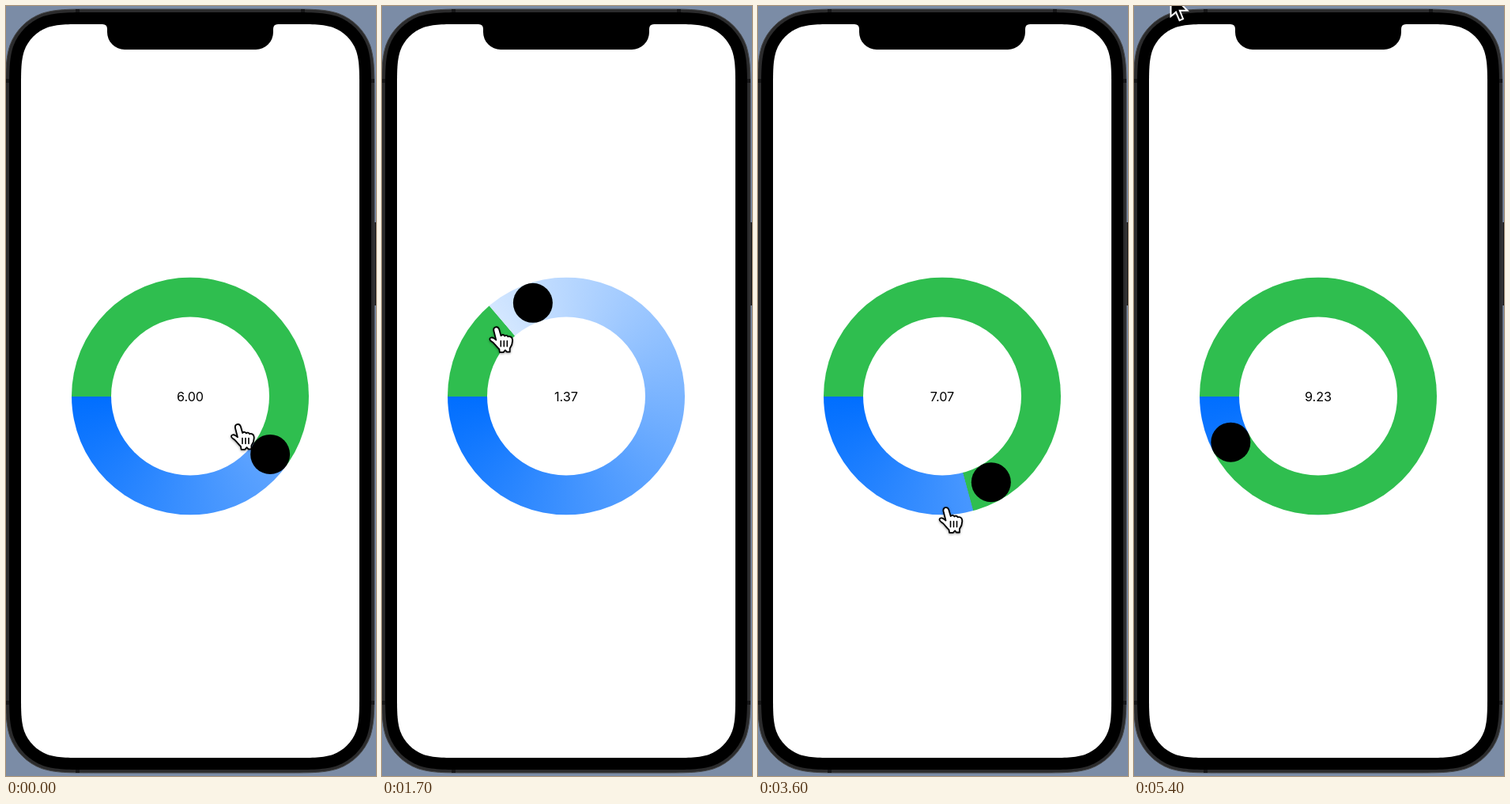
These frames come from a looping animation (468x972 px, 5500 ms). An HTML page:

```html
<!DOCTYPE html>
<html lang="en">
<head>
<meta charset="utf-8">
<title>Circular slider</title>
<style>
  html, body { margin: 0; width: 100%; height: 100%; overflow: hidden; background: #7b8ca6; }
  #stage { position: relative; width: 468px; height: 972px; overflow: hidden; }
  svg { position: absolute; left: 0; top: 0; }
  #ring {
    position: absolute; left: 83px; top: 342px; width: 300px; height: 300px; border-radius: 50%;
    transform: translateY(.5px);
    background:
      conic-gradient(from 270deg, #2fbe4f var(--v), transparent calc(var(--v) + .08%)),
      conic-gradient(from 270deg, #f5faff, #006eff);
  }
  #hole { position: absolute; inset: 50px; border-radius: 50%; background: #fff; }
</style>
</head>
<body>
<div id="stage">
  <svg width="468" height="972">
    <path d="M466 273h2v105h-2z" fill="#17181a"/>
    <path id="rim" fill="#2b2b2c" stroke="#464748"/>
    <path d="M0 92h4v5h-4zM0 877h4v5h-4zM462 92h4v5h-4zM462 877h4v5h-4zM88 4h5v4h-5zM373 4h5v4h-5zM88 964h5v4h-5z" fill="#171718"/>
    <path id="bezel"/>
    <path id="screen" fill="#fff"/>
    <path d="M122 22v1q6 0 6 6v4a22 22 0 0 0 22 22h166a22 22 0 0 0 22-22v-4q0-6 6-6v-1z"/>
  </svg>
  <div id="ring"><div id="hole"></div></div>
  <svg width="468" height="972">
    <text id="label" x="233" y="498.7" text-anchor="middle" font-family="Inter, sans-serif" font-size="16.2"></text>
    <circle id="knob" r="25"/>
    <g id="hand" stroke="#000" stroke-linejoin="round" stroke-linecap="round" style="filter:drop-shadow(0 1.5px 1.5px rgba(0,0,0,.4))">
      <path fill="#fff" stroke-width="1.8" d="M-2.2 4.6C-3-.6 3-1.6 4.6 2.8L7 11C8 9.2 11 9.4 11.6 11.4 12.8 10 15.2 10.5 15.8 12.2 18 11.4 21 12.4 21.4 15.5 22 20 20.4 24 18.2 27V31.4H14.4L12.4 29.2 10 31.8H5.4L4.8 28C1.8 25.4-.2 22.2-2.6 20-4.6 18.2-7.2 17.4-7.2 15.2-7.2 13-4.2 12.6-1.8 14.4L.8 16.4z"/>
      <path stroke-width="1.6" d="M6.8 17.5v7M10.8 17.5v7M14.8 17.5v7"/>
    </g>
    <path id="arrow" d="M0 0V28.5L6.5 23 11 33.5 15.5 31.5 11.3 21.2H21z" stroke="#fff" stroke-width="2"/>
  </svg>
</div>
<script>
const LOOP = 5500, STEP = 100, LAG = 150;
const CX = 233, CY = 492.5, TRACK = 125;
const $ = id => document.getElementById(id);

// Drag turning points: time, dial value (0 to 10)
const dial = [
  [300, 6], [900, 4.9], [1700, 1.37], [2100, .87], [2400, 2.44],
  [2950, 5.375], [3100, 5.76], [4200, 8.55], [4700, 9.23]
];

// Pointer path: time, direction on the dial, distance from its centre
const pointer = [
  [0, 5.86, 69], [900, 4.445, 113], [1700, 1.23, 125], [2050, .8, 127], [2400, 2.26, 133],
  [3100, 5.75, 145], [4200, 9.01, 131], [4900, 9.5, 120], [5400, 11.94, 541]
];

// Smooth curve through the keys, level at the ends and at every turn.
function curve(keys, t, col = 1) {
  const last = keys.length - 1;
  if (t <= keys[0][0]) return keys[0][col];
  if (t >= keys[last][0]) return keys[last][col];

  const slope = i => {
    if (i === 0 || i === last) return 0;
    const [a, b, c] = keys.slice(i - 1, i + 2);
    const turns = (b[col] - a[col]) * (c[col] - b[col]) <= 0;
    return turns ? 0 : (c[col] - a[col]) / (c[0] - a[0]);
  };
  const i = keys.findIndex(k => k[0] > t);
  const a = keys[i - 1], b = keys[i], span = b[0] - a[0];
  const s = (t - a[0]) / span, r = 1 - s;
  return a[col] + (b[col] - a[col]) * s * s * (3 - 2 * s) +
    span * s * r * (r * slope(i - 1) - s * slope(i));
}

function onDial(value, radius) {
  const a = Math.PI * (1 + value / 5);
  return [CX + radius * Math.cos(a), CY + radius * Math.sin(a)];
}

// Rectangle with continuous corners, drawn clockwise from the top left.
function continuous(l, t, r, b, radius) {
  const corners = [[l, t, 1, 0], [r, t, 0, 1], [r, b, -1, 0], [l, b, 0, -1]];
  return corners.map(([x, y, qx, qy], n) => {
    const at = (back, ahead) =>
      `${x + radius * (ahead * qx - back * qy)} ${y + radius * (ahead * qy + back * qx)} `;
    return (n ? 'L' : 'M') + at(1.529, 0) +
      'C' + at(1.088, 0) + at(.868, 0) + at(.631, .075) +
      at(.373, .169) + at(.169, .373) + at(.075, .631) +
      at(0, .868) + at(0, 1.088) + at(0, 1.529);
  }).join('') + 'z';
}

function place(el, [x, y], shown = true) {
  el.setAttribute('transform', `translate(${x.toFixed(2)} ${y.toFixed(2)})`);
  el.setAttribute('visibility', shown ? 'visible' : 'hidden');
}

function draw(time) {
  const t = Math.floor(time % LOOP / STEP) * STEP;
  const value = curve(dial, t);
  $('ring').style.setProperty('--v', value * 10 + '%');
  $('label').textContent = value.toFixed(2);
  place($('knob'), onDial(curve(dial, t - LAG), TRACK));

  const tip = onDial(curve(pointer, t), curve(pointer, t, 2));
  const outside = tip[1] < 23;
  place($('hand'), tip, !outside);
  place($('arrow'), tip, outside);
}

$('rim').setAttribute('d', continuous(-.5, 4, 466, 968, 72.5));
$('bezel').setAttribute('d', continuous(4, 8, 462, 964, 68.3));
$('screen').setAttribute('d', continuous(19, 23, 447, 949, 53.3));

const start = performance.now();
function tick() {
  draw(performance.now() - start);
  requestAnimationFrame(tick);
}
tick();
</script>
</body>
</html>
```
